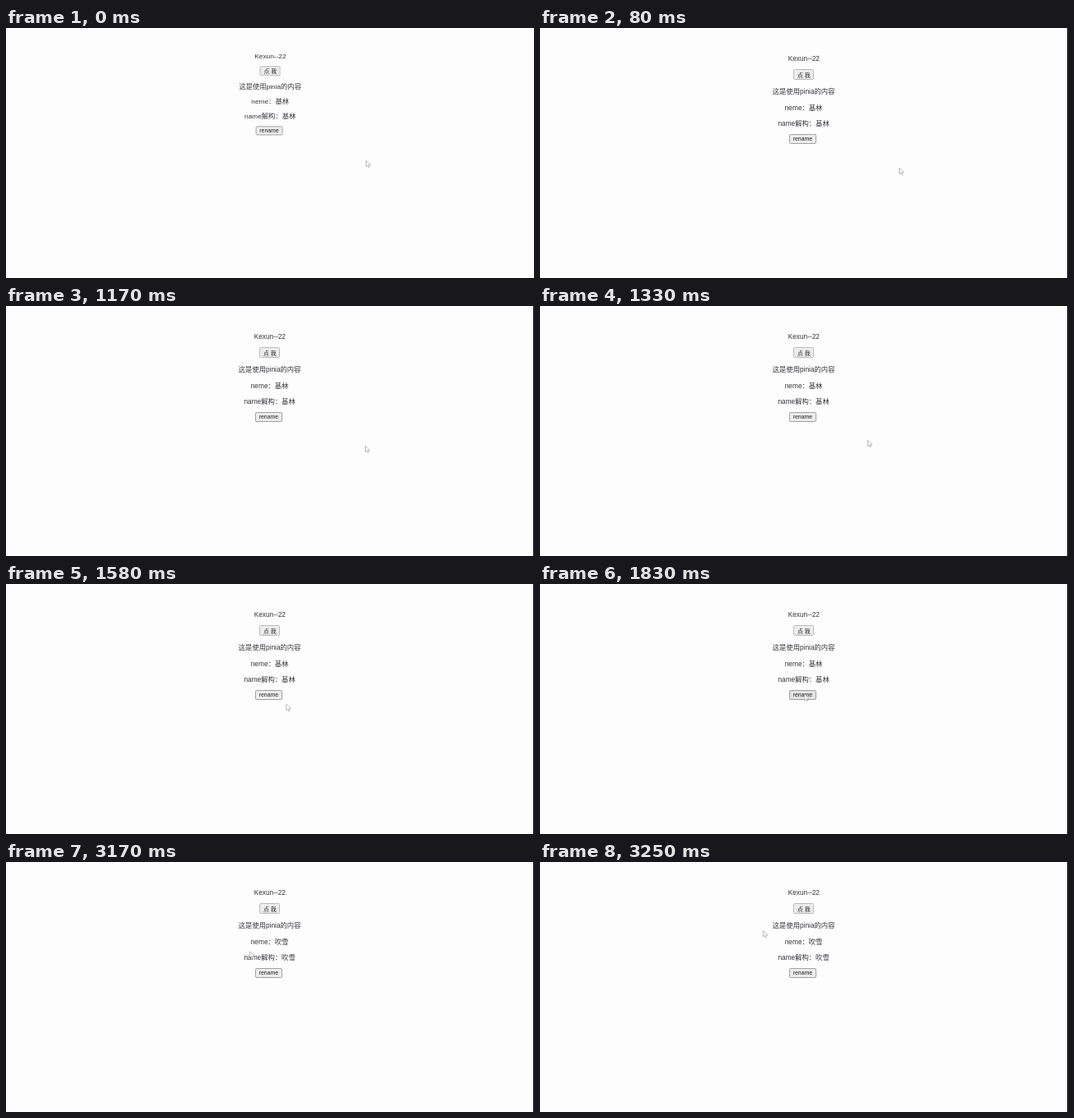
Animation, 640 px wide and 304 px high, one loop 3.33 s. Source, as an HTML page:

```html
<!DOCTYPE html>
<html lang="zh-CN">
<head>
<meta charset="utf-8">
<title>pinia</title>
<style>
html, body { margin: 0; width: 100%; height: 100%; overflow: hidden; background: #fdfdfd; }
svg { display: block; }
text {
  font: 8.3px "Liberation Sans", "Noto Sans CJK SC", "Noto Sans CJK", sans-serif;
  text-anchor: middle;
  fill: #36363c;
}
.label { font-size: 6.93px; fill: #222; }
.button { fill: #ededee; stroke: #bcbcbe; }
#rename { stroke: #a2a2a6; }
#rename.hover { fill: #e2e2e3; }
</style>
</head>
<body>
<svg width="640" height="304" viewBox="0 0 640 304">
  <g id="page">
    <text x="319.8" y="39.6">Kexun--22</text>
    <rect class="button" x="307.5" y="50.5" width="24" height="12" rx="1"/>
    <text class="label" x="319.8" y="59.7">点 我</text>
    <text x="319.6" y="80">这是使用pinia的内容</text>
    <text x="319.6" y="99.5">neme：<tspan class="name"></tspan></text>
    <text x="319.6" y="119">name解构：<tspan class="name"></tspan></text>
    <rect class="button" id="rename" x="302.5" y="129.5" width="32" height="11" rx="1.5"/>
    <text class="label" x="318.4" y="137.4">rename</text>
  </g>
  <rect id="edge" x="639" width="1" height="304" fill="#111"/>
  <path id="cursor" d="M.5 .5V8L2.3 6.4L3.5 9L4.7 8.5L3.6 6H6Z" fill="#fff" stroke="#aaa" stroke-width=".8"/>
</svg>
<script>
const LOOP = 3330, FPS = 12;
const $ = id => document.getElementById(id);
const names = document.querySelectorAll('.name');

function draw(now) {
  const tick = Math.floor((now % LOOP + 5) * FPS / 1000);
  const span = (from, to) => Math.min(1, Math.max(0, (tick - from) / (to - from)));
  const resized = span(0, 1), approach = span(14, 20), leave = span(37, 39);

  const x = 436 - resized - 115 * approach - 50 * leave;
  const y = 160.5 + 9 * resized - 30.5 * approach ** 1.35 - 5.5 * span(20, 22) - 50.5 * leave;
  $('cursor').setAttribute('transform', `translate(${x} ${y})`);

  // The page starts slightly flattened.
  $('page').setAttribute('transform', resized ? '' : 'translate(.6 0) scale(1 .925)');
  $('edge').style.display = resized ? '' : 'none';
  $('rename').classList.toggle('hover', tick >= 20 && tick < 38);
  names.forEach(n => n.textContent = tick < 28 ? '基林' : '吹雪');
  requestAnimationFrame(draw);
}
requestAnimationFrame(draw);
</script>
</body>
</html>
```
